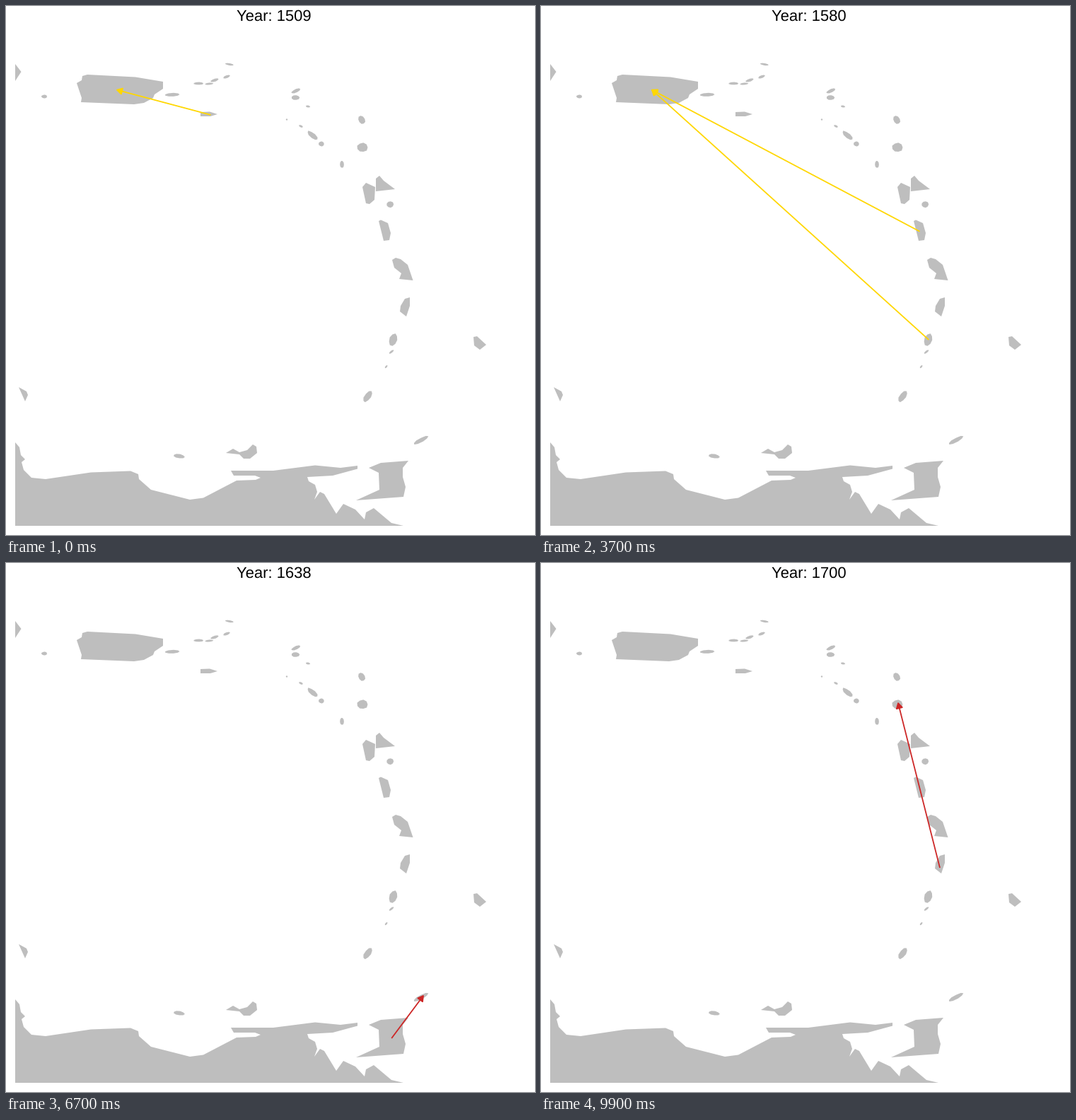
Recreate the animation shown at these times as a matplotlib script. Size 748 by 748 pixels, loop 10000 ms.

```python
import numpy as np
import matplotlib.pyplot as plt
from matplotlib.animation import FuncAnimation
from matplotlib.patches import Polygon

SIZE, DPI, FRAMES = 748, 88, 100
PX = 72 / DPI
FIRST, LAST = 1509, 1700
GREY = "#bebebe"
GOLD, RED, BLUE, ORANGE = "#ffd700", "#cd2626", "#104e8b", "#ff8c00"
HEAD, WIDTH = 8.3, 1.78

plt.rcParams["font.family"] = "Liberation Sans"
plt.rcParams["text.hinting"] = "none"
rng = np.random.default_rng(7)
fig = plt.figure(figsize=(SIZE / DPI, SIZE / DPI), dpi=DPI, facecolor="white")
ax = fig.add_axes([0, 0, 1, 1])
ax.set_xlim(0, SIZE)
ax.set_ylim(SIZE, 0)
ax.axis("off")


def land(*pts):
    ax.add_patch(Polygon(pts, closed=True, fc=GREY, ec="none", lw=0))


def isle(x, y, w, h, tilt=0):
    """Small angular island: a slightly rough ellipse, tilted in degrees."""
    t = np.arange(9) * 2 * np.pi / 9
    r = rng.uniform(0.93, 1.07, t.size)
    u, v = r * w / 2 * np.cos(t), r * h / 2 * np.sin(t)
    c, s = np.cos(np.radians(tilt)), np.sin(np.radians(tilt))
    land(*zip(x + u * c - v * s, y + u * s + v * c))


# mainland
land((13, 617), (19, 624), (21, 635), (27, 641), (22, 645), (25, 656),
     (36, 667), (56, 669), (120, 659.5), (176, 657.5), (187, 662),
     (188, 669), (205, 684), (260, 698), (279, 695.5), (326, 671),
     (353, 670), (360, 667), (352, 664), (322, 664), (318, 657),
     (378, 657), (437, 649.5), (473, 653), (497, 650), (497, 654.5),
     (462, 664), (426, 666), (428, 672), (437, 677), (440, 687),
     (436, 698), (444, 687), (450, 690), (467, 718), (477, 704),
     (494, 712), (507, 726), (509, 716), (520, 710), (545, 731),
     (562, 735), (13, 735))

# large islands
land((100, 109), (107, 105), (108, 99), (115, 97), (183, 100.5), (222, 107),
     (222, 117), (210, 125), (208, 130), (195, 137), (181, 139), (106, 136),
     (107, 130))
land((504, 256), (509, 250), (522, 256), (521, 274), (514, 280), (509, 279))
land((523, 244), (528, 240), (534, 247), (550, 259), (523, 262))
land((527, 304), (530, 302.5), (540, 307), (544, 321), (542, 331), (534, 332))
land((546, 359), (551, 356), (558, 358), (568, 366), (575.5, 388), (556, 386),
     (559, 378), (549, 370))
land((571, 412), (571, 424), (566, 439), (557, 432), (558, 424), (564, 414))
land((661, 468), (666, 467), (679, 479), (670, 486), (662, 480))
land((513, 653), (530, 646), (569, 643), (561, 653), (561, 666), (565, 680),
     (562, 694), (495, 699), (528, 684), (527, 660))
land((311, 632), (321, 626), (330, 631), (341, 628), (349, 620), (354, 623),
     (355, 632), (345, 640), (336, 640), (330, 634))
land((275, 150), (288, 149.5), (299, 153), (289, 156), (275, 156))
land((18, 539), (29, 545), (31, 550), (27, 559))
land((13, 82), (21.5, 93), (13, 106))

# small islands of the north-west
isle(54, 128, 8, 5)
isle(235, 125.5, 21, 5, -2)
isle(272, 109.5, 14, 4)
isle(287, 110, 12, 3, -5)
isle(295, 105, 12, 4, -18)
isle(312, 100, 10, 4, -20)
isle(316, 82.5, 12, 3, 10)

# small islands of the arc
isle(410, 120, 14, 5, -25)
isle(409.5, 129.5, 11, 7)
isle(427, 142, 6, 3, 10)
isle(397, 160.5, 2.5, 2.5)
isle(417, 170, 6, 3, 25)
isle(433.5, 183, 18, 7, 40)
isle(446, 195, 8, 7)
isle(475, 224, 10, 6, 90)
isle(503, 161, 12, 9, 60)
isle(504, 200, 15, 13)
isle(543, 280.5, 10, 9)
isle(547.5, 472, 18, 11, -70)
isle(545, 489, 8, 3, -40)
isle(537.5, 510, 5, 2.5, -50)
isle(511.5, 552, 19, 9, -55)
isle(586.5, 614, 23, 6, -28)
isle(244.5, 636.5, 16, 6, 8)

PLACES = dict(
    croix=(289.5, 154), puerto=(157, 118.7), coast=(369, 719.5),
    trinidad=(545.2, 672), dominica=(535.5, 318.8), vincent=(548.3, 472),
    martinique=(565, 376), lucia=(564, 431), grenada=(510.5, 551),
    barbuda=(499.5, 162), antigua=(505, 198.2), tobago=(590, 612),
    margarita=(352, 634), barbados=(671, 477))

# year, colour, goal, starting places
RAIDS = [
    (1509, GOLD, "puerto", "croix"),
    (1520, GOLD, "trinidad", "coast"),
    (1530, GOLD, "puerto", "dominica"),
    (1553, GOLD, "trinidad", "coast dominica"),
    (1567, GOLD, "puerto", "martinique"),
    (1580, GOLD, "puerto", "dominica vincent"),
    (1588, GOLD, "trinidad", "dominica"),
    (1605, RED, "lucia", "vincent"),
    (1613, GOLD, "trinidad", "coast"),
    (1622, GOLD, "trinidad", "dominica martinique"),
    (1628, ORANGE, "tobago", "vincent"),
    (1633, GOLD, "margarita", "coast"),
    (1638, RED, "tobago", "trinidad"),
    (1657, BLUE, "grenada", "grenada"),
    (1664, RED, "lucia", "vincent"),
    (1681, RED, "barbuda", "coast dominica vincent"),
    (1690, RED, "barbados", "vincent"),
    (1700, RED, "antigua", "lucia"),
]

# each raid flashes on the frame nearest to its year
SPAN = (FRAMES - 1) / (LAST - FIRST)
BY_FRAME = {round((year - FIRST) * SPAN): raid for year, *raid in RAIDS}


class Arrow:
    def __init__(self):
        self.line, = ax.plot([], [], lw=WIDTH * PX, solid_capstyle="butt")
        self.head = ax.add_patch(Polygon([(0, 0)] * 3, closed=True,
                                         lw=WIDTH * PX, joinstyle="round"))
        self.hide()

    def hide(self):
        self.line.set_visible(False)
        self.head.set_visible(False)

    def show(self, start, tip, color):
        (x0, y0), (x1, y1) = start, tip
        back = np.arctan2(y0 - y1, x0 - x1)
        wings = [(x1 + HEAD * np.cos(back + a), y1 + HEAD * np.sin(back + a))
                 for a in (np.pi / 6, -np.pi / 6)]
        self.line.set_data([x0, x1], [y0, y1])
        self.head.set_xy([wings[0], tip, wings[1]])
        for part in (self.line, self.head):
            part.set_color(color)
            part.set_visible(True)


arrows = [Arrow() for _ in range(3)]
title = ax.text(326, 21, "", fontsize=22 * PX, color="black",
                ha="left", va="baseline")


def draw(i):
    year = FIRST + (LAST - FIRST) * i // (FRAMES - 1)
    title.set_text(f"Year: {year}")
    color, goal, starts = BY_FRAME.get(i, (None, None, ""))
    for arrow in arrows:
        arrow.hide()
    for arrow, start in zip(arrows, starts.split()):
        arrow.show(PLACES[start], PLACES[goal], color)
    return [title]


anim = FuncAnimation(fig, draw, frames=FRAMES, interval=100, repeat=True,
                     repeat_delay=0, init_func=lambda: draw(0))
plt.show()
```
